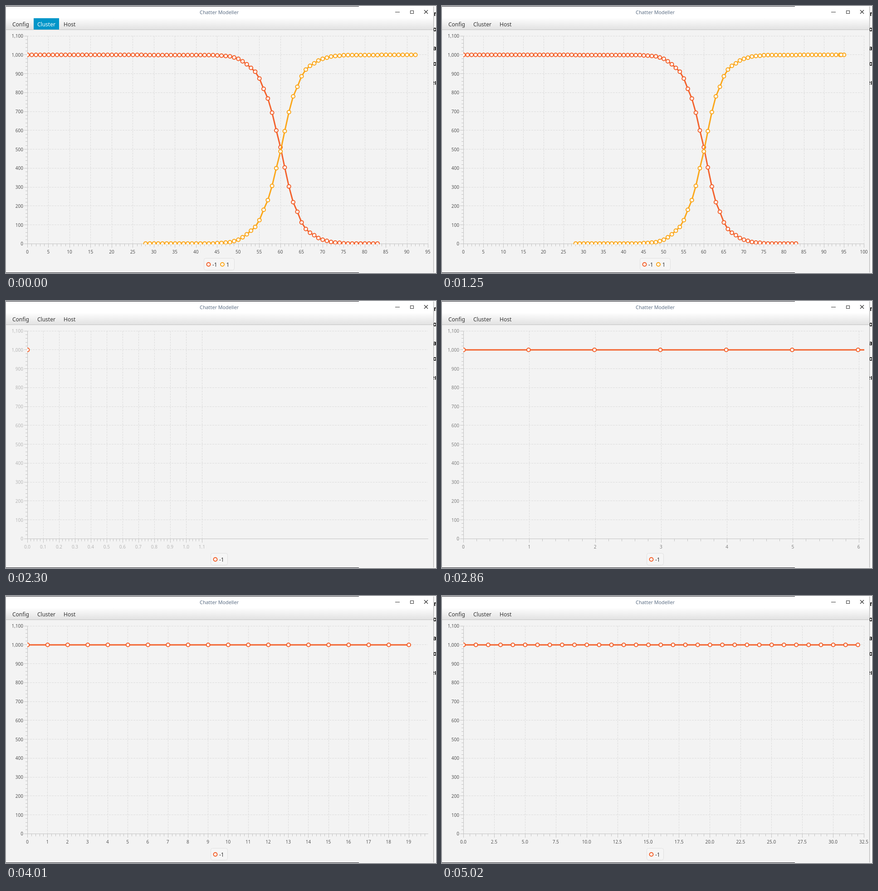
Recreate the animation shown at these times as an HTML page with a canvas. Size 948 by 590 pixels, loop 5090 ms.

```html
<!DOCTYPE html>
<html lang="en">
<head>
<meta charset="utf-8">
<title>Chatter Modeller</title>
<style>
  html, body { margin: 0; width: 100%; height: 100%; overflow: hidden; background: #fff; }
  canvas { display: block; }
</style>
</head>
<body>
<canvas id="stage" width="948" height="590"></canvas>
<script>
const ctx = document.getElementById('stage').getContext('2d');
const LOOP = 5090, FONT = '"Noto Sans", "Open Sans", sans-serif';
const LEFT = 47, RIGHT = 930, TOP = 66, BASE = 525, WIDE = RIGHT - LEFT;
const ORANGE = '#f3622d', YELLOW = '#fba71b', BLUE = '#0096c9';
const AXIS = '#c3c3c3', GRID = '#dcdcdc', LABEL = '#555';
const OPEN = 130, CLICK = 1040, CLEAR = 1413, GONE = 2000;

// Every change of the x axis: start, upper bound, tick step, whether the y labels blink too
const axes = [
  { at: -9999, max: 95, step: 5 },
  { at: 75, max: 100, step: 5, blink: true },
  { at: CLEAR, max: 110, step: 10, blink: true },
  { at: GONE, max: 1.1, step: 0.1, blink: true },
  { at: 2350, max: 18, step: 1, blink: true },
  { at: 3324, max: 20, step: 1 },
  { at: 4260, max: 32.5, step: 2.5 }
];

// Nodes that know the message, from tick 45 to tick 75
const spread = [3, 4, 6, 8, 14, 21, 34, 50, 69, 89, 125, 180, 231, 306, 400, 489,
  596, 697, 780, 831, 887, 922, 942, 955, 970, 979, 985, 991, 994, 995, 998];
const known = i => i < 28 ? 0 : i < 45 ? 1 : i < 76 ? spread[i - 45] : i < 84 ? 999 : 1000;

const clamp = v => Math.max(0, Math.min(1, v));
const ramp = (t, from, length) => clamp((t - from) / length);
const cubic = p => p < 0.5 ? 4 * p ** 3 : 1 - 4 * (1 - p) ** 3;
const easeBoth = p => p < 0.2 ? 3.125 * p * p : p < 0.8 ? 1.25 * p - 0.125 : 1 - 3.125 * (1 - p) ** 2;
const yOf = v => 525.3 - v * 0.4173;

let from = WIDE / 95;
for (const a of axes) {
  a.from = from;
  a.to = WIDE / a.max;
  const next = axes[axes.indexOf(a) + 1];
  if (next) from = scaleOf(a, next.at);
}
function scaleOf(a, t) { return a.from + (a.to - a.from) * ramp(t, a.at, 700); }
function axisAt(t) { return axes.filter(a => a.at <= t).pop(); }

function box(x, y, w, h, color) {
  ctx.fillStyle = color;
  ctx.fillRect(x, y, w, h);
}
function text(s, x, y, size, color, align = 'left', weight = '') {
  ctx.font = `${weight} ${size}px ${FONT}`;
  ctx.textAlign = align;
  ctx.fillStyle = color;
  ctx.fillText(s, x, y);
}
function line(points, color, width = 1, dash = []) {
  ctx.beginPath();
  points.forEach(([x, y]) => ctx.lineTo(x, y));
  ctx.strokeStyle = color;
  ctx.lineWidth = width;
  ctx.setLineDash(dash);
  ctx.stroke();
  ctx.setLineDash([]);
}
function panel(x, y, w, h, r, fill, border) {
  ctx.beginPath();
  ctx.roundRect(x, y, w, h, r);
  ctx.fillStyle = fill;
  ctx.fill();
  ctx.shadowColor = 'transparent';
  ctx.strokeStyle = border;
  ctx.lineWidth = 1;
  ctx.stroke();
}
function marker(x, y, color) {
  ctx.beginPath();
  ctx.arc(x, y, 3, 0, 7);
  ctx.fillStyle = '#fff';
  ctx.fill();
  ctx.beginPath();
  ctx.arc(x, y, 4, 0, 7);
  ctx.strokeStyle = color;
  ctx.lineWidth = 2;
  ctx.stroke();
}
function series(points, color) {
  line(points, color, 3);
  points.forEach(([x, y]) => marker(x, y, color));
}

function drawWindow() {
  box(0, 0, 948, 590, '#fff');
  box(0, 0, 778, 1, '#1c1c22');
  box(0, 589, 778, 1, '#1c1c22');
  [['n', 943, 22], ['o', 941, 56], ['a', 941, 98], ['o', 941, 132], ['er', 937, 174]]
    .forEach(([s, x, y]) => text(s, x, y, 14, '#111', 'left', 'bold'));
  box(942, 1, 1, 588, '#b4b4b4');
  box(943, 1, 2, 588, 'rgba(0,0,0,.08)');
  box(0, 1, 942, 26, '#fff');
  box(0, 52, 942, 537, '#f3f3f3');
  const shade = ctx.createLinearGradient(0, 27, 0, 52);
  shade.addColorStop(0, '#fdfdfd');
  shade.addColorStop(1, '#e2e2e2');
  box(0, 27, 942, 25, shade);
  box(0, 52, 942, 1, '#c4c4c4');
  text('Chatter Modeller', 470, 18, 10.8, '#5c6e84', 'center');
  line([[858, 13.5], [868, 13.5]], '#333');
  ctx.strokeRect(891.5, 10.5, 7, 6);
  line([[922, 9], [930, 17]], '#333', 1.2);
  line([[930, 9], [922, 17]], '#333', 1.2);
}

function drawMenu(t) {
  const active = t < CLICK;
  if (active) box(61, 27, 56, 25, BLUE);
  text('Config', 14, 45, 12, '#333');
  text('Cluster', 69, 45, 12, active ? '#fff' : '#333');
  text('Host', 127, 45, 12, '#333');
  if (t < OPEN || !active) return;
  ctx.shadowColor = 'rgba(0,0,0,.4)';
  ctx.shadowBlur = 10;
  ctx.shadowOffsetY = 4;
  panel(61.5, 53.5, 69, 135, 0, '#fff', '#b5b5b5');
  box(62, 57, 67, 26, BLUE);
  ['Init', 'Restart', 'Add Msg', 'Run', 'Freeze'].forEach((s, i) =>
    text(s, 68, 74.5 + i * 25.4, 12, i ? '#333' : '#fff'));
}

function xLabels(a, scale) {
  const digits = a.step % 1 ? 1 : 0;
  for (let i = 0; i * a.step <= a.max + 1e-6; i++) {
    const x = LEFT + i * a.step * scale;
    if (x < RIGHT + 1) text((i * a.step).toFixed(digits), x, 546.5, 10, LABEL, 'center');
  }
}
function yLabels() {
  for (let v = 0; v <= 1100; v += 100)
    text(v.toLocaleString('en-US'), 38, yOf(v) + 4, 10, LABEL, 'right');
}

function drawAxes(t, a, scale) {
  const dash = [4, 2];
  const count = Math.round(a.max / a.step) * 5;
  for (let i = 0; i <= count; i++) {
    const x = Math.round(LEFT + i * a.step / 5 * scale) + 0.5;
    if (x > RIGHT + 1) break;
    const major = i % 5 === 0;
    if (major && i) line([[x, TOP], [x, BASE]], GRID, 1, dash);
    line([[x, 526], [x, major ? 534 : 531]], AXIS);
  }
  for (let i = 0; i <= 55; i++) {
    const y = Math.round(yOf(i * 20) - 0.5) + 0.5;
    const major = i % 5 === 0;
    if (major && i) line([[LEFT, y], [RIGHT, y]], GRID, 1, dash);
    line([[major ? 40 : 43, y], [LEFT, y]], AXIS);
  }
  line([[47.5, TOP], [47.5, 526]], AXIS);
  line([[LEFT, 525.5], [RIGHT + 1, 525.5]], AXIS);

  // Old labels fade out where they stood while the new ones fade in
  const fadeIn = easeBoth(ramp(t, a.at, 750)), fadeOut = 1 - easeBoth(ramp(t, a.at, 250));
  const old = axes[axes.indexOf(a) - 1];
  ctx.globalAlpha = fadeIn;
  xLabels(a, scale);
  if (a.blink) yLabels();
  if (old && fadeOut > 0) {
    ctx.globalAlpha = fadeOut;
    xLabels(old, a.from);
    if (a.blink) yLabels();
  }
  ctx.globalAlpha = 1;
  if (!a.blink) yLabels();
}

// A tick added at a given time slides in from two ticks back
const slide = (i, t, at) => Math.max(0, i - 2 * (1 - cubic(ramp(t, at, 580))));

function drawOldRun(t, scale) {
  const cleared = t >= CLEAR;
  const last = t < 75 ? 92 : t < 1060 ? 95 : 96;
  const xOf = i => LEFT + 0.5 + scale *
    (i > 95 ? slide(i, t, 1060) : i > 92 ? slide(i, t, 75) : i);
  const fresh = [], informed = [];
  for (let i = 0; i <= last; i++) {
    if (i < 84) fresh.push([xOf(i), yOf(1000 - known(i))]);
    if (i >= 28) informed.push([xOf(i), yOf(known(i))]);
  }
  ctx.globalAlpha = 1 - ramp(t, 1460, GONE - 1460);
  series(fresh, ORANGE);
  series(informed, cleared ? ORANGE : YELLOW);
  ctx.globalAlpha = 1;
  if (cleared) marker(xOf(95), yOf(1000), ORANGE);
}

function drawNewRun(t, scale) {
  const rise = ramp(t, 1317, 700);
  const points = [[LEFT + 0.5, yOf(1000 * rise)]];
  const last = t < 2350 ? 0 : t < 3310 ? 18 : t < 4260 ? 19 : 32;
  for (let i = 1; i <= last; i++) {
    const at = i < 19 ? 2350 : i < 20 ? 3310 : 4260;
    points.push([LEFT + 0.5 + slide(i, t, at) * scale, yOf(1000)]);
  }
  ctx.globalAlpha = clamp(rise * 1.2);
  series(points, ORANGE);
  ctx.globalAlpha = 1;
}

function drawLegend(both) {
  const x = both ? 436.5 : 451.5;
  panel(x, 557.5, both ? 67 : 37, 26, 4, '#f5f5f5', '#e0e0e0');
  marker(x + 10, 571, ORANGE);
  text('-1', x + 18.5, 575.5, 12, '#333');
  if (!both) return;
  marker(477, 571, YELLOW);
  text('1', 485.5, 575.5, 12, '#333');
}

function draw(t) {
  const a = axisAt(t), scale = scaleOf(a, t);
  drawWindow();
  drawAxes(t, a, scale);
  ctx.save();
  ctx.beginPath();
  ctx.rect(LEFT, TOP, WIDE + 1, BASE - TOP + 1.5);
  ctx.clip();
  if (t < GONE) drawOldRun(t, t < CLEAR ? scale : WIDE / 100);
  if (t >= CLEAR) drawNewRun(t, scale);
  ctx.restore();
  drawLegend(t < CLEAR);
  ctx.save();
  drawMenu(t);
  ctx.restore();
}

const start = performance.now();
function frame() {
  draw((performance.now() - start) % LOOP);
  requestAnimationFrame(frame);
}
frame();
</script>
</body>
</html>
```
